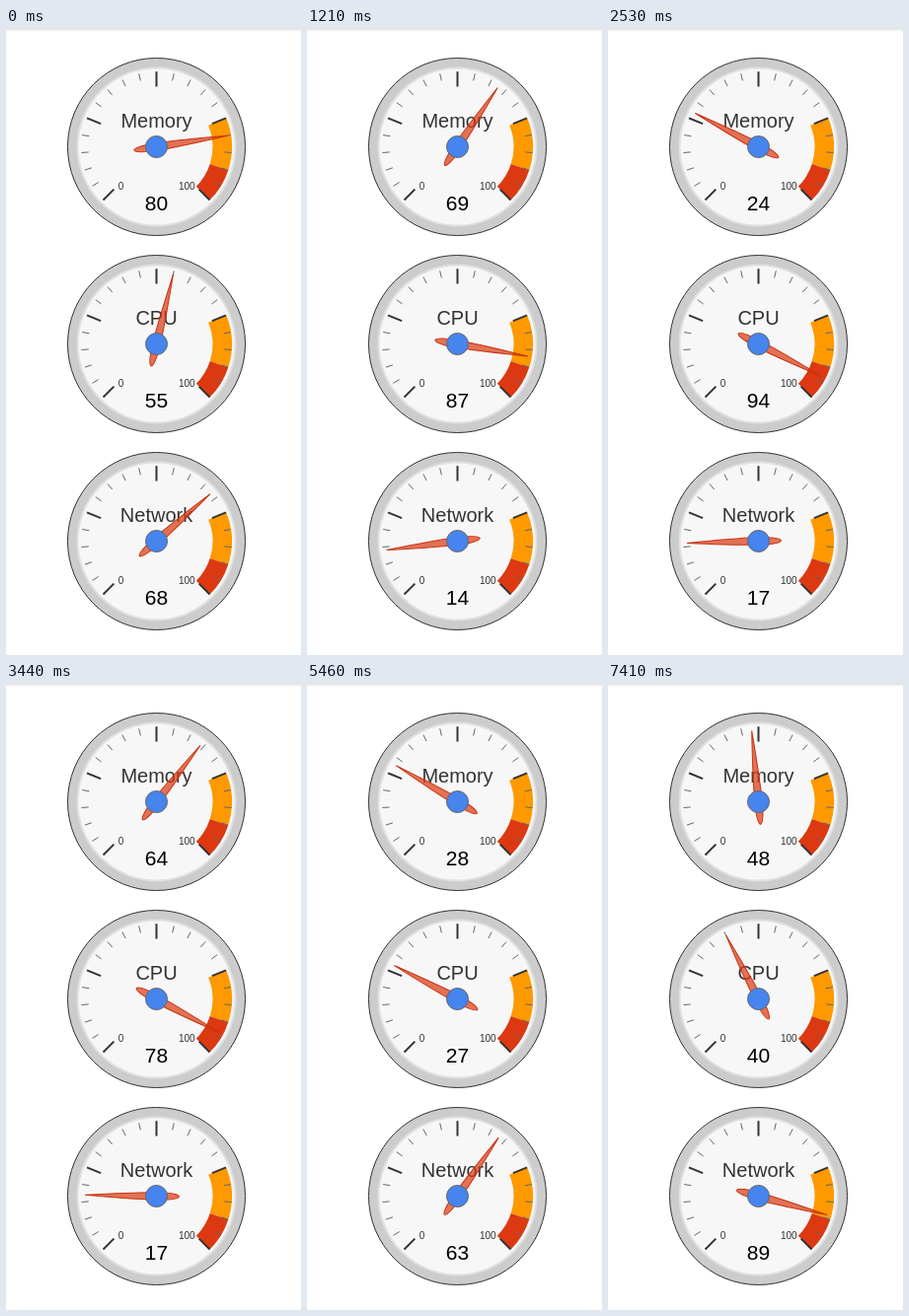
Animation, 299 px wide and 636 px high, one loop 8000 ms. Source, as an HTML page:

```html
<!DOCTYPE html>
<html>
<head>
<meta charset="utf-8">
<title>Gauges</title>
<style>
  html, body { margin: 0; width: 100%; height: 100%; overflow: hidden; background: #fff; }
  body { background: linear-gradient(#dcdcdc, #f0f0f0 2px, #fff 4px) no-repeat; }
  svg { display: block; }
  text { font-family: "Liberation Sans", Arial, sans-serif; fill: #333; }
  .title { font-size: 20px; text-anchor: middle; }
  .value { font-size: 21px; text-anchor: middle; fill: #000; }
  .limit { font-size: 10px; }
</style>
</head>
<body>
<svg id="stage" width="299" height="636"></svg>
<script>
const LOOP = 8000;
const NAMES = ['Memory', 'CPU', 'Network'];
const START = [80, 55, 68];

// Bursts of stepped motion: moves are [gauge, target, first step, last step].
const BURSTS = [
  { from: 500, to: 1360, steps: 11, moves: [[0, 48, 0, 5], [1, 87, 0, 5], [2, 14, 2, 7], [0, 69, 6, 11]] },
  { from: 1660, to: 2680, steps: 13, moves: [[0, 34, 0, 5], [1, 92, 3, 8], [0, 24, 8, 13], [1, 94, 8, 13], [2, 17, 8, 13]] },
  { from: 2980, to: 3830, steps: 11, moves: [[0, 64, 0, 5], [1, 78, 6, 11]] },
  { from: 4000, to: 4370, steps: 5, moves: [[0, 78, 0, 5]] },
  { from: 4600, to: 5460, steps: 11, moves: [[0, 60, 0, 5], [2, 63, 0, 5], [0, 28, 6, 11], [1, 27, 6, 11]] },
  { from: 6010, to: 6410, steps: 5, moves: [[0, 1, 0, 5]] },
  { from: 6790, to: 7410, steps: 8, moves: [[0, 48, 0, 5], [1, 40, 3, 8], [2, 89, 3, 8]] }
];

const angle = v => 135 + 2.7 * v;

function polar(v, r) {
  const a = angle(v) * Math.PI / 180;
  return (r * Math.cos(a)).toFixed(2) + ' ' + (r * Math.sin(a)).toFixed(2);
}

function band(a, b, color) {
  const outer = 76.5, inner = 57;
  return `<path fill="${color}" d="M${polar(a, outer)} A${outer} ${outer} 0 0 1 ${polar(b, outer)}
    L${polar(b, inner)} A${inner} ${inner} 0 0 0 ${polar(a, inner)}Z"/>`;
}

function ticks() {
  let out = '';
  for (let i = 0; i <= 20; i++) {
    const major = i % 5 === 0;
    out += `<path stroke="${major ? '#333' : '#666'}" stroke-width="${major ? 2 : 1}"
      d="M${polar(i * 5, major ? 61 : 69)} L${polar(i * 5, 76.3)}"/>`;
  }
  return out;
}

function gauge(name, i) {
  return `<g transform="translate(152.5 ${120.5 + 200 * i})">
    <circle r="90" fill="#ccc" stroke="#333"/>
    <circle r="80" fill="#f7f7f7" stroke="#e0e0e0" stroke-width="2"/>
    ${band(75, 90, '#ff9900')}${band(90, 100, '#dc3912')}
    <text class="title" y="-19.5">${name}</text>
    ${ticks()}
    <text class="limit" x="-38.7" y="43.5">0</text>
    <text class="limit" x="39.2" y="43.5" text-anchor="end">100</text>
    <text class="value" y="64.5"></text>
    <path class="needle" fill="#dc3912" fill-opacity=".7" stroke="#c63310"
      d="M72.5 0 C10 4.5 -21 5.5 -23 0 C-21 -5.5 10 -4.5 72.5 0Z"/>
    <circle r="11" fill="#4684ee" stroke="#666"/>
  </g>`;
}

const stage = document.getElementById('stage');
stage.innerHTML = NAMES.map(gauge).join('');
const needles = stage.querySelectorAll('.needle');
const values = stage.querySelectorAll('.value');

const ease = p => (1 - Math.cos(Math.PI * p)) / 2;

function stateAt(t) {
  const pos = [...START], label = [...START];
  for (const { from, to, steps, moves } of BURSTS) {
    if (t < from) break;
    const step = Math.floor((t - from) / (to - from) * steps + 0.2);
    for (const [g, target, first, last] of moves) {
      if (step < first) continue;
      const p = Math.min(1, (step - first + 0.4) / (last - first + 0.4));
      pos[g] += (target - pos[g]) * ease(p);
      label[g] = target;
    }
  }
  return { pos, label };
}

let origin;
function draw(now) {
  origin ??= now;
  const { pos, label } = stateAt((now - origin) % LOOP);
  NAMES.forEach((_, i) => {
    needles[i].setAttribute('transform', `rotate(${angle(pos[i])})`);
    values[i].textContent = label[i];
  });
  requestAnimationFrame(draw);
}
requestAnimationFrame(draw);
</script>
</body>
</html>
```
